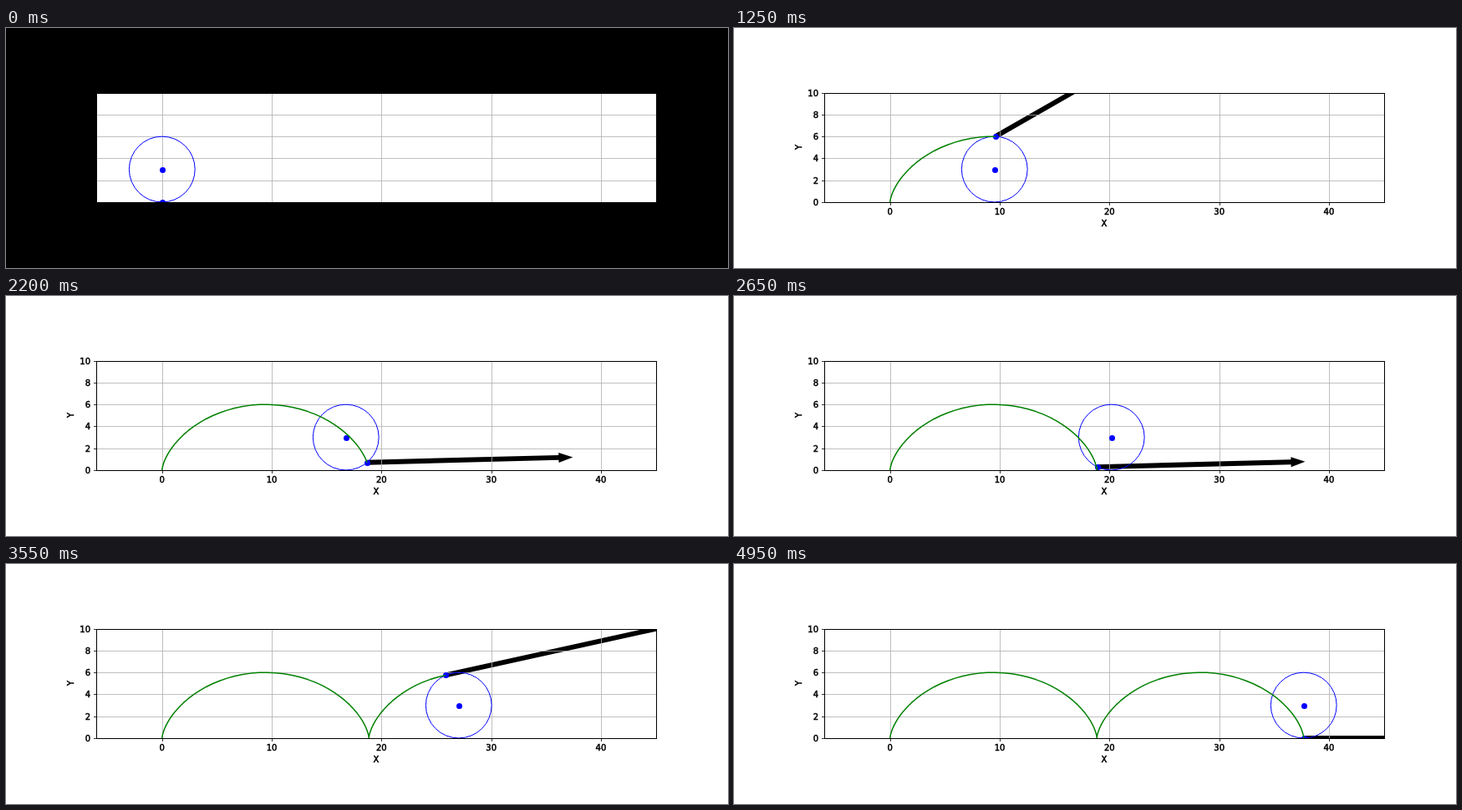
These frames come from a looping animation (864x288 px, 5000 ms). An HTML page:

```html
<!DOCTYPE html>
<html lang="en">
<head>
<meta charset="utf-8">
<title>Cycloid</title>
<style>
  html, body { margin: 0; width: 100%; height: 100%; overflow: hidden; background: #fff; }
  svg { display: block; width: 864px; height: 288px; }
  text { font: 10px "DejaVu Sans", sans-serif; stroke: #000; stroke-width: .5px; }
</style>
</head>
<body>
<svg viewBox="0 0 864 288" xmlns="http://www.w3.org/2000/svg">
  <defs><clipPath id="area"><rect x="108" y="78" width="670" height="131"/></clipPath></defs>
  <rect id="back" width="864" height="288"/>
  <rect x="108" y="78" width="670" height="131" fill="#fff"/>
  <g clip-path="url(#area)">
    <path id="arrow"/>
    <path id="grid" stroke="#b0b0b0" stroke-width=".8"/>
    <circle id="wheel" fill="none" stroke="#00f"/>
    <circle id="hub" r="3.5" fill="#00f"/>
    <circle id="rim" r="3.5" fill="#00f"/>
    <path id="trail" fill="none" stroke="#008000" stroke-width="1.5" stroke-linejoin="round"/>
  </g>
  <path id="ticks" stroke="#000" stroke-width=".8"/>
  <rect x="108.5" y="78.5" width="670" height="131" fill="none" stroke="#000"/>
  <g id="labels"></g>
</svg>
<script>
const STEPS = 100, STEP_MS = 50, R = 3;
const UNIT = 669.6 / 51, X0 = 108 + 6 * UNIT, Y0 = 208.93;
const SHAFT = 5.9, HEAD_W = 12, HEAD_L = 17;

const $ = id => document.getElementById(id);
const px = x => X0 + x * UNIT;
const py = y => Y0 - y * UNIT;
const snap = v => Math.floor(v + 0.5) + 0.5;
const set = (el, attrs) => { for (const k in attrs) el.setAttribute(k, attrs[k]); };

function label(str, x, y, anchor, turn) {
  const t = document.createElementNS("http://www.w3.org/2000/svg", "text");
  t.textContent = str;
  set(t, { x, y, "text-anchor": anchor });
  if (turn) t.setAttribute("transform", `rotate(-90 ${x} ${y})`);
  $("labels").append(t);
}

function drawAxes() {
  let grid = "", ticks = "";
  for (let v = 0; v <= 40; v += 10) {
    const x = snap(px(v));
    grid += `M${x} 78V210`;
    ticks += `M${x} 209.5v3.5`;
    label(v, px(v), 224, "middle");
  }
  for (let v = 0; v <= 10; v += 2) {
    const y = snap(py(v));
    grid += `M108 ${y}H778`;
    ticks += `M108.5 ${y}h-3.5`;
    label(v, 101, y + 3.5, "end");
  }
  label("X", 443, 238, "middle");
  label("Y", 81, 143, "middle", true);
  $("grid").setAttribute("d", grid);
  $("ticks").setAttribute("d", ticks);
}

// Position on the cycloid after n steps, in axis units
function cycloid(n) {
  const a = 4 * Math.PI * n / (STEPS - 1);
  return { a, x: R * (a - Math.sin(a)), y: R * (1 - Math.cos(a)) };
}

// Arrow at (x, y) along the vector v; short arrows shrink as a whole
function arrowPath(x, y, v) {
  const len = Math.hypot(v.x, v.y) * UNIT;
  if (len < 1) return "";
  const k = Math.min(1, len / HEAD_L);
  const ux = v.x * UNIT / len, uy = -v.y * UNIT / len;
  const s = SHAFT / 2 * k, h = HEAD_W / 2 * k, neck = len - HEAD_L * k;
  const pts = [[0, s], [neck, s], [neck, h], [len, 0], [neck, -h], [neck, -s], [0, -s]];
  return "M" + pts.map(([p, q]) =>
    `${(x + p * ux - q * uy).toFixed(2)} ${(y + p * uy + q * ux).toFixed(2)}`).join("L") + "Z";
}

function draw(n) {
  const p = cycloid(n), next = cycloid(Math.min(n + 1, STEPS - 1));
  const cx = px(R * p.a), cy = py(R);
  let d = "";
  for (let i = 0; i <= n; i++) {
    const q = cycloid(i);
    d += `${i ? "L" : "M"}${px(q.x).toFixed(2)} ${py(q.y).toFixed(2)}`;
  }
  $("back").setAttribute("fill", n ? "#fff" : "#000");
  $("trail").setAttribute("d", d);
  $("arrow").setAttribute("d", arrowPath(px(p.x), py(p.y), next));
  set($("wheel"), { cx, cy, r: R * UNIT });
  set($("hub"), { cx: snap(cx), cy: snap(cy) });
  set($("rim"), { cx: snap(px(p.x)), cy: snap(py(p.y)) });
}

const start = performance.now();
function tick() {
  draw(Math.floor((performance.now() - start) / STEP_MS) % STEPS);
  requestAnimationFrame(tick);
}
drawAxes();
tick();
</script>
</body>
</html>
```
